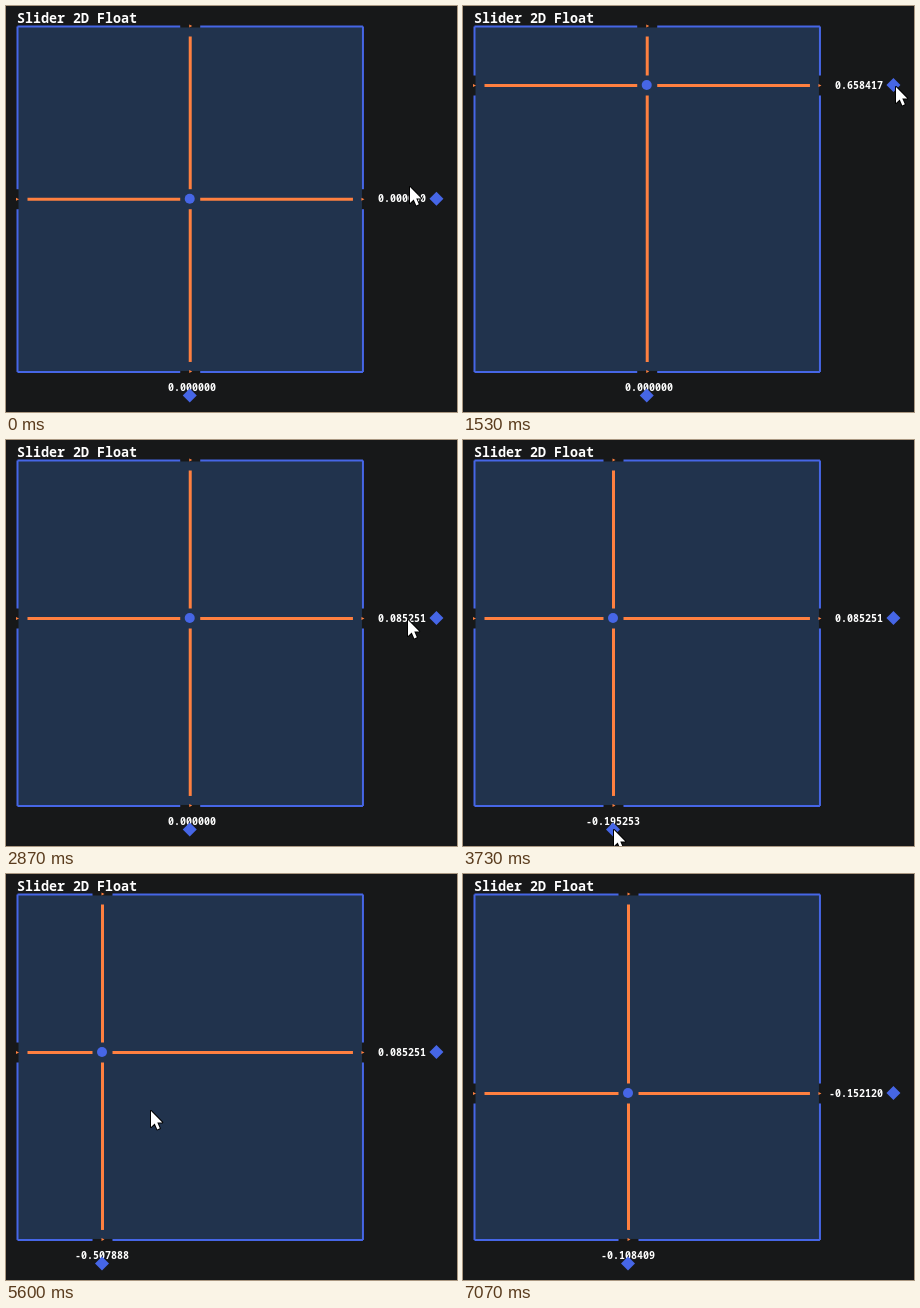
An HTML page with a canvas for the animation above (7740 ms loop, 451 by 406 pixels).

```html
<!DOCTYPE html>
<html lang="en">
<head>
<meta charset="utf-8">
<title>Slider 2D</title>
<style>
  html, body { margin: 0; width: 100%; height: 100%; overflow: hidden; background: #171819; }
  canvas { display: block; }
</style>
</head>
<body>
<canvas id="stage" width="451" height="406"></canvas>
<script>
const ctx = document.getElementById('stage').getContext('2d');

const LOOP = 7740, TICK = 200 / 3;
const BG = '#171819', PANEL = '#21334d', BLUE = '#4666e6', ORANGE = '#ff8040';
const FONT = '"Noto Sans Mono", "DejaVu Sans Mono", monospace';
const UNIT = 172.725, GAP = 10;
const LEFT = 11, MID_X = LEFT + UNIT, RIGHT = MID_X + UNIT;
const TOP = 20, MID_Y = TOP + UNIT, BOTTOM = MID_Y + UNIT;

// Turning points of the pointer as [tick, position], eased in between
const SWING_X = [[0, 403], [6, 427], [41, 438], [49, 184], [53.6, 184],
                 [60.6, 55], [74.5, 312], [81, 96], [84, 144]];
const SWING_Y = [[0, 179], [6, 190], [12, 190], [17.9, 41], [37.32, 278],
                 [41, 160], [43, 178], [49, 388], [81, 388], [84, 235]];
const ROUND_START = 84, ROUND_END = 101, EXIT_END = 105;

// When each handle is held, in ticks
const HOLD_Y = [9, 43], HOLD_X = [49, 81], HOLD_BOTH = [86, 101];

const clamp = (v, lo, hi) => Math.min(hi, Math.max(lo, v));
const mix = (a, b, u) => a + (b - a) * u;
const ease = u => (1 - Math.cos(Math.PI * clamp(u, 0, 1))) / 2;

function swing(points, tick) {
  let i = 0;
  while (i < points.length - 2 && points[i + 1][0] <= tick) i++;
  const [t0, a] = points[i], [t1, b] = points[i + 1];
  return mix(a, b, ease((tick - t0) / (t1 - t0)));
}

function pointer(tick) {
  let x, y;
  if (tick < ROUND_START) {
    x = swing(SWING_X, tick);
    y = swing(SWING_Y, tick);
  } else {
    // One loop through the panel, then out at the bottom
    const u = clamp((tick - ROUND_START) / (ROUND_END - ROUND_START), 0, 1);
    const angle = 2 * Math.PI * u;
    const exit = ease((tick - ROUND_END) / (EXIT_END - ROUND_END));
    x = mix(144, 165, u) - 60 * Math.sin(angle) + 35 * exit;
    y = mix(235, 219, u) - 112 * (1 - Math.cos(angle)) + 220 * exit;
  }
  return { x: Math.round(x), y: Math.round(y) };
}

function handle(tick, axis, hold, rest) {
  if (tick < hold[0]) return rest;
  const end = tick < HOLD_BOTH[0] ? hold[1] : HOLD_BOTH[1];
  return pointer(Math.min(tick, end))[axis];
}

// Strokes run through pixel centres
function line(color, width, x0, y0, x1, y1) {
  if (x1 < x0 || y1 < y0) return;
  ctx.beginPath();
  ctx.moveTo(x0 + 0.5, y0 + 0.5);
  ctx.lineTo(x1 + 0.5, y1 + 0.5);
  ctx.strokeStyle = color;
  ctx.lineWidth = width;
  ctx.stroke();
}

function polygon(color, points) {
  ctx.beginPath();
  points.forEach(([x, y]) => ctx.lineTo(x, y));
  ctx.closePath();
  ctx.fillStyle = color;
  ctx.fill();
}

const diamond = (x, y) => polygon(BLUE, [[x - 7, y], [x, y - 7], [x + 7, y], [x, y + 7]]);
const notch = (x, y) => polygon(ORANGE, [[x - 1, y - 1.5], [x + 2, y], [x - 1, y + 1.5]]);

function label(text, size, x, y, align) {
  ctx.font = `600 ${size}px ${FONT}`;
  ctx.textAlign = align;
  ctx.fillStyle = '#fff';
  ctx.fillText(text, x, y);
}

function drawPanel(x, y) {
  ctx.fillStyle = PANEL;
  ctx.fillRect(LEFT + 1, TOP + 1, RIGHT - LEFT - 1, BOTTOM - TOP - 1);
  for (const edge of [LEFT, RIGHT]) {
    line(BG, 2, edge, y - GAP, edge, y + GAP);
    line(BLUE, 2, edge, TOP, edge, y - GAP);
    line(BLUE, 2, edge, y + GAP, edge, BOTTOM);
    notch(edge, y + 0.5);
  }
  for (const edge of [TOP, BOTTOM]) {
    line(BG, 2, x - GAP, edge, x + GAP, edge);
    line(BLUE, 2, LEFT, edge, x - GAP, edge);
    line(BLUE, 2, x + GAP, edge, RIGHT, edge);
    notch(x + 0.5, edge);
  }
}

function drawCross(x, y) {
  line(ORANGE, 3, x, TOP + GAP, x, y - GAP);
  line(ORANGE, 3, x, y + GAP, x, BOTTOM - GAP);
  line(ORANGE, 3, LEFT + GAP, y, x - GAP, y);
  line(ORANGE, 3, x + GAP, y, RIGHT - GAP, y);
  ctx.beginPath();
  ctx.arc(x, y, 5, 0, Math.PI * 2);
  ctx.fillStyle = BLUE;
  ctx.fill();
}

function drawPointer({ x, y }) {
  const shape = [[0, 0], [0, 16], [3.7, 12.6], [6.3, 18.4], [8.8, 17.3], [6.3, 11.6], [11.3, 11.4]];
  ctx.save();
  ctx.translate(x + 1, y + 2);
  ctx.lineWidth = 2;
  ctx.lineJoin = 'round';
  ctx.strokeStyle = '#000';
  polygon('#fff', shape);
  ctx.stroke();
  polygon('#fff', shape);
  ctx.restore();
}

function draw(tick) {
  const x = clamp(handle(tick, 'x', HOLD_X, MID_X), LEFT, RIGHT);
  const y = clamp(handle(tick, 'y', HOLD_Y, MID_Y), TOP, BOTTOM);

  ctx.fillStyle = BG;
  ctx.fillRect(0, 0, 451, 406);
  label('Slider 2D Float', 13.333, 11, 17, 'left');
  drawPanel(x, y);
  drawCross(x, y);
  label(((x - MID_X) / UNIT).toFixed(6), 10, Math.floor(x) + 27, 385, 'right');
  label(((MID_Y - y) / UNIT).toFixed(6), 10, 420, Math.floor(y) + 4, 'right');
  diamond(x, BOTTOM + 24);
  diamond(RIGHT + 74, y);
  drawPointer(pointer(tick));
}

const start = performance.now();

function frame() {
  const t = (performance.now() - start) % LOOP;
  draw(Math.floor((t + 4) / TICK));
  requestAnimationFrame(frame);
}
frame();
</script>
</body>
</html>
```
